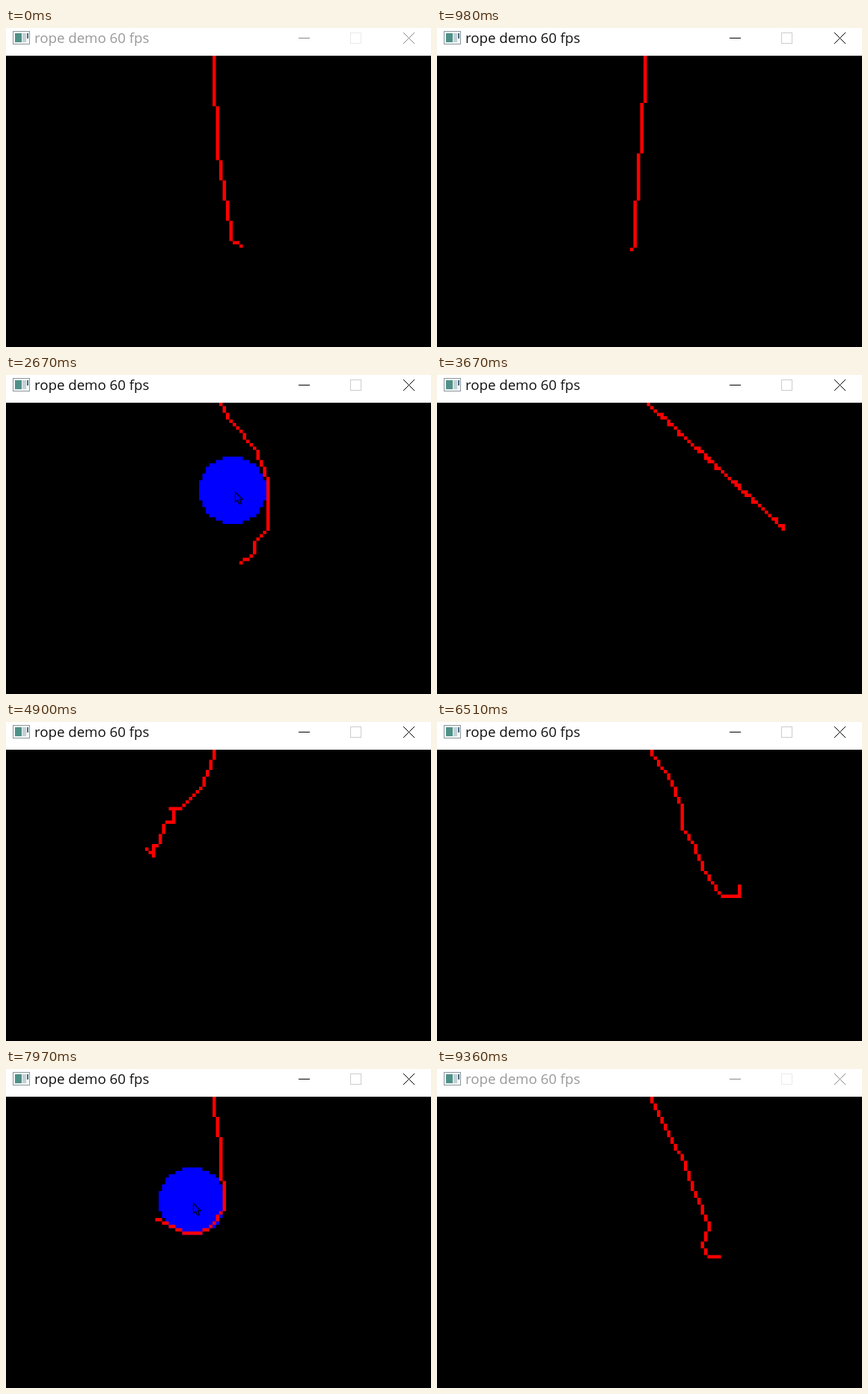
Write an HTML page with a canvas that moves like this. It is 568 px wide and 426 px high and loops after 9430 ms.

```html
<!DOCTYPE html>
<html lang="en">
<head>
<meta charset="utf-8">
<title>rope demo</title>
<style>
  html, body { margin: 0; width: 100%; height: 100%; overflow: hidden; background: #000; }
  canvas { display: block; }
</style>
</head>
<body>
<canvas id="stage" width="568" height="426"></canvas>
<script>
const ctx = document.getElementById('stage').getContext('2d');
const LOOP = 9430, STEP = 76.8, LAST = 122;
const CELL = 4.5, LEFT = 1.5, TOP = 37, RADIUS = 10, SEGMENTS = 32;
const lerp = (a, b, u) => a + (b - a) * u;
const bearing = (p, q) => Math.atan2(q[0] - p[0], q[1] - p[1]);
const distance = (p, q) => Math.hypot(q[0] - p[0], q[1] - p[1]);

// Rope poses in grid cells, from the anchor down: bent ones by their corners,
// free swings by an angle from the vertical and a length.
const poses = [];

function bend(step, corners) {
  const points = corners.split(' ').map(p => p.split(',').map(Number));
  poses.push({ step, points, links: divide(points) });
}

function swing(step, degrees, length = 58) {
  const angle = degrees * Math.PI / 180;
  bend(step, `62,0 ${62 + length * Math.sin(angle)},${length * Math.cos(angle)}`);
}

function divide(points) {
  const lengths = points.slice(1).map((p, i) => distance(points[i], p));
  const total = lengths.reduce((a, b) => a + b);
  const out = [];
  let side = 0, passed = 0;
  for (let i = 0; i <= SEGMENTS; i++) {
    const at = total * i / SEGMENTS;
    while (side < lengths.length - 1 && passed + lengths[side] < at) passed += lengths[side++];
    const u = (at - passed) / lengths[side];
    out.push(points[side].map((v, k) => lerp(v, points[side + 1][k], u)));
  }
  return out;
}

bend(0, '61,0 62,15 63,31 67,55 70,56.5');
swing(13, -4);
bend(22, '62.6,0 61,22 60,34 58.8,58');
swing(26, -1);
bend(35, '63.4,0 66,5 74,14 77,22 77,38 74,41 73,45 69,47.9');
swing(45, 63, 60);
swing(52, 27, 50);
swing(58, -3, 60);
bend(64, '62,0 58,11 52,17 48.5,17.5 49.9,21 47,22 45,28 43,29 43.5,32 41,29');
swing(70, -31, 52);
swing(78, -2);
bend(85, '63,0 68,7.4 72,16 73,24 76,28 79,36 84,43 89,44 89.5,40');
swing(91, 28, 54);
swing(97, 1);
bend(104, '61,0 63,12 64,25 64,34 61,38 58,40 52,40 44,36');
swing(112, 0, 60);
swing(117, 21, 56);
bend(122, '63,0 66,6 70,14 73,19 76,28 80,37 80,40 78,44.5 80,47 84,47');

// Ball drags; slip is the pointer's sideways offset from the centre in pixels.
const drags = [
  { from: 14, to: 43, x: [18, 74.5], y: [16.3, 29.7], slip: [16, -2] },
  { from: 90, to: 106, x: [39, 56], y: [30, 31], slip: [1, 1] }
];

function ropeAt(step) {
  const i = poses.findIndex(p => p.step >= step);
  const b = poses[i];
  if (b.step === step) return b.points;
  const a = poses[i - 1], u = (step - a.step) / (b.step - a.step);
  let x = lerp(a.links[0][0], b.links[0][0], u), y = 0;
  const out = [[x, y]];
  for (let k = 0; k < SEGMENTS; k++) {
    const from = a.links.slice(k, k + 2), to = b.links.slice(k, k + 2);
    const angle = lerp(bearing(...from), bearing(...to), u);
    const length = lerp(distance(...from), distance(...to), u);
    x += Math.sin(angle) * length;
    y += Math.cos(angle) * length;
    out.push([x, y]);
  }
  return out;
}

function addCells(path, col, row, count = 1) {
  path.rect(LEFT + col * CELL, TOP + row * CELL, count * CELL, CELL);
}

function drawRope(points) {
  const path = new Path2D();
  for (let i = 1; i < points.length; i++) {
    const [ax, ay] = points[i - 1], [bx, by] = points[i];
    const n = Math.ceil(Math.max(Math.abs(bx - ax), Math.abs(by - ay)));
    for (let k = 0; k < n; k++) {
      const u = (k + 0.5) / n;
      addCells(path, Math.floor(lerp(ax, bx, u)), Math.floor(lerp(ay, by, u)));
    }
  }
  ctx.fillStyle = '#f00';
  ctx.fill(path);
}

function drawBall(step) {
  const drag = drags.find(d => step >= d.from && step <= d.to);
  if (!drag) return;
  const u = (step - drag.from) / (drag.to - drag.from);
  const col = Math.round(lerp(...drag.x, 1 - (1 - u) ** 1.6));
  const row = Math.round(lerp(...drag.y, u));
  const path = new Path2D();
  for (let k = -RADIUS; k < RADIUS; k++) {
    const half = Math.round(Math.sqrt(RADIUS ** 2 - (k + 0.5) ** 2));
    addCells(path, col - half, row + k, 2 * half);
  }
  ctx.fillStyle = '#00f';
  ctx.fill(path);
  drawPointer(Math.round(LEFT + col * CELL + lerp(...drag.slip, u)), Math.round(TOP + row * CELL + 2));
}

function drawPointer(x, y) {
  ctx.save();
  ctx.translate(x + 0.5, y + 0.5);
  ctx.strokeStyle = '#000';
  ctx.lineWidth = 1.2;
  ctx.stroke(new Path2D('M0 0V13L3 10.5L5.5 16L8 15L5.7 9.7H9.7Z'));
  ctx.restore();
}

function box(color, x, y, w, h) {
  ctx.fillStyle = color;
  ctx.fillRect(x, y, w, h);
}

function drawTitleBar(active) {
  box('#fff', 0, 0, 568, 37);
  box('#8d989c', 9, 4, 23, 18);
  box('#f4f7f8', 10, 5, 21, 16);
  box('#4f9189', 12, 7, 9, 12);
  box('#c3d0d3', 22, 7, 5, 12);
  box('#4a6c86', 28, 7, 2, 7);

  ctx.fillStyle = active ? '#111' : '#999';
  ctx.font = '18.65px "Open Sans", "Noto Sans", sans-serif';
  ctx.fillText('rope demo 60 fps', 38, 20);

  ctx.lineWidth = 1;
  ctx.strokeStyle = active ? '#000' : '#888';
  ctx.stroke(new Path2D('M391 13.5H406M531 6L546 21M546 6L531 21'));
  ctx.strokeStyle = active ? '#ccc' : '#eaeaea';
  ctx.strokeRect(460.5, 6.5, 14, 14);
}

function draw(step) {
  box('#000', 0, 0, 568, 426);
  drawBall(step);
  drawRope(ropeAt(step));
  drawTitleBar(step >= 5 && step < 120);
}

const start = performance.now();
function tick() {
  const t = (performance.now() - start) % LOOP;
  draw(Math.min(LAST, Math.floor((t + 21) / STEP)));
  requestAnimationFrame(tick);
}
tick();
</script>
</body>
</html>
```
